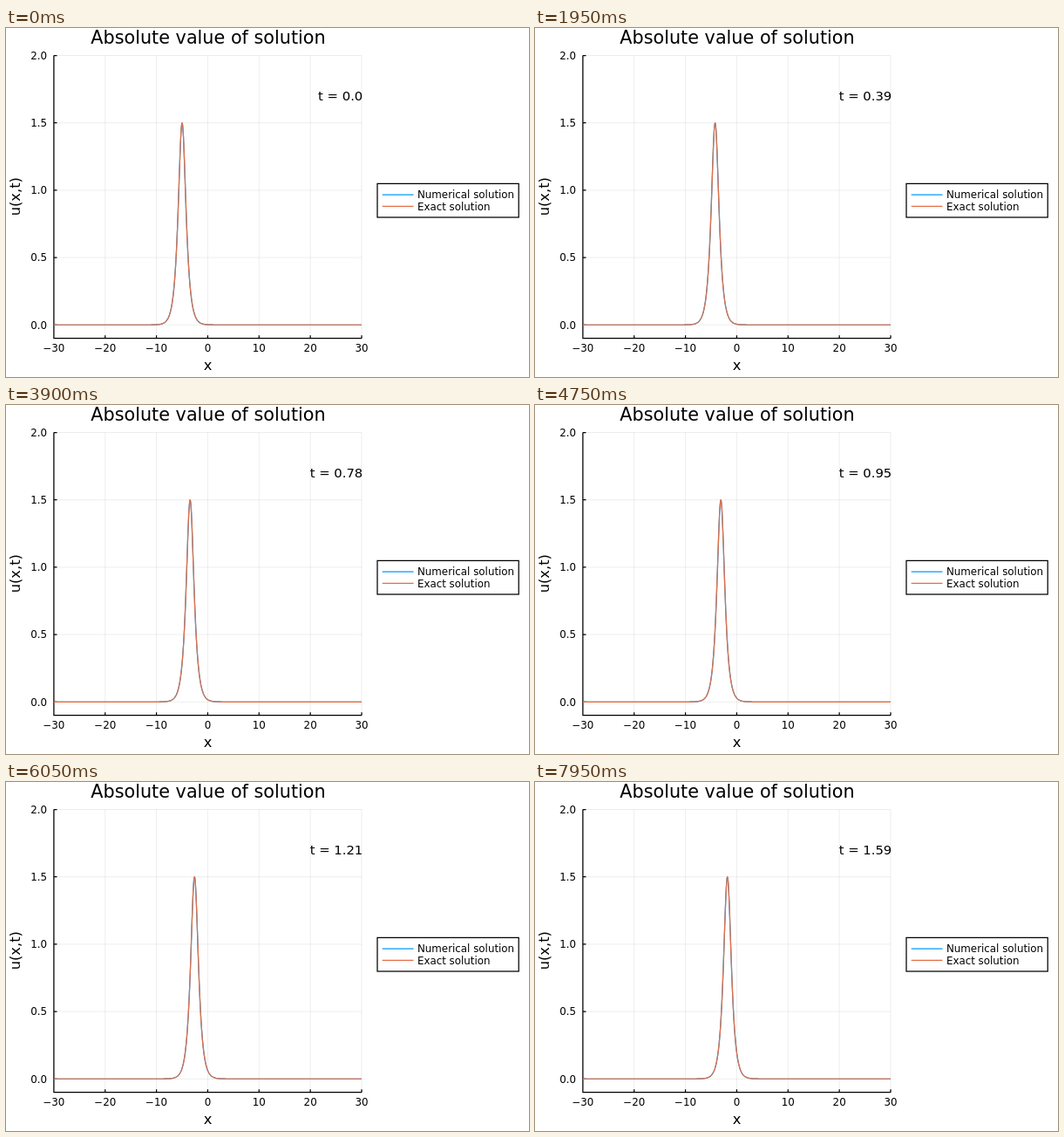
Animation, 600 px wide and 400 px high, one loop 8000 ms. Source, as an HTML page:

```html
<!DOCTYPE html>
<html lang="en">
<head>
<meta charset="utf-8">
<title>Absolute value of solution</title>
<style>
  html, body { margin: 0; width: 100%; height: 100%; overflow: hidden; background: #fff; }
  svg { display: block; width: 600px; height: 400px; }
  text { font-family: "DejaVu Sans", sans-serif; font-size: 11.86px; fill: #000; }
  path, rect { fill: none; stroke-width: 1.25; }
  .mid { text-anchor: middle; }
  .end { text-anchor: end; }
  .grid { stroke: #000; stroke-opacity: .1; stroke-width: .7; }
  .axis { stroke: #000; }
  .num { stroke: #009afa; }
  .exact { stroke: #e26f46; }
  .curve { stroke-linejoin: round; }
</style>
</head>
<body>
<svg viewBox="0 0 600 400">
  <path id="grid" class="grid"/>
  <path id="axis" class="axis"/>
  <g id="ticks"></g>
  <text class="mid" x="232" y="18.4" style="font-size:20.75px">Absolute value of solution</text>
  <text class="mid" x="231.5" y="391.6" style="font-size:16.3px">x</text>
  <text class="mid" transform="translate(16.4 193.2) rotate(-90)" style="font-size:16.3px">u(x,t)</text>
  <path class="num curve"/>
  <path class="exact curve"/>
  <text id="clock" class="end" x="409.3" y="82.5" style="font-size:14.82px"></text>
  <rect class="axis" x="426" y="178.4" width="162.2" height="38.6"/>
  <path class="num" d="M431.7 191.1H467.5"/>
  <path class="exact" d="M431.7 204.3H467.5"/>
  <text x="471.9" y="195.4">Numerical solution</text>
  <text x="471.9" y="208.6">Exact solution</text>
</svg>
<script>
const LOOP = 8000, STEP = 50;
const px = x => 231.45 + x * 5.885;
const py = y => 340.3 - y * 154.4;
const left = px(-30), right = px(30), top_ = py(2), bottom = py(-0.1);
const $ = id => document.getElementById(id);

function label(text, x, y, cls) {
  const el = document.createElementNS("http://www.w3.org/2000/svg", "text");
  el.setAttribute("class", cls);
  el.setAttribute("x", x);
  el.setAttribute("y", y);
  el.textContent = text;
  $("ticks").append(el);
}

function drawAxes() {
  let grid = "";
  let axis = `M${left} ${top_}V${bottom}H${right}`;
  for (let v = -30; v <= 30; v += 10) {
    const x = px(v);
    grid += `M${x} ${top_}V${bottom}`;
    axis += `M${x} ${bottom}v-3.6`;
    label(String(v).replace("-", "\u2212"), x, 371.4, "mid");
  }
  for (let v = 0; v <= 2; v += 0.5) {
    const y = py(v);
    grid += `M${left} ${y}H${right}`;
    axis += `M${left} ${y}h3.6`;
    label(v.toFixed(1), 47.1, y + 4.2, "end");
  }
  $("grid").setAttribute("d", grid);
  $("axis").setAttribute("d", axis);
}

// Soliton 1.5 sech(1.5 (x + 5 - 2t))
function soliton(t) {
  const pts = [];
  for (let i = 0; i <= 1000; i++) {
    const x = -30 + i * 0.06;
    const u = 1.5 / Math.cosh(1.5 * (x + 5 - 2 * t));
    pts.push(px(x).toFixed(2) + " " + py(u).toFixed(2));
  }
  return "M" + pts.join("L");
}

const curves = document.querySelectorAll(".curve");
let shown = -1;

function render(ms) {
  const n = Math.floor((ms % LOOP) / STEP);
  if (n === shown) return;
  shown = n;
  const t = n / 100;
  const d = soliton(t);
  curves.forEach(c => c.setAttribute("d", d));
  $("clock").textContent = "t = " + (n % 100 ? t : t.toFixed(1));
}

drawAxes();
render(0);
const start = performance.now();
function tick() {
  render(performance.now() - start);
  requestAnimationFrame(tick);
}
requestAnimationFrame(tick);
</script>
</body>
</html>
```
